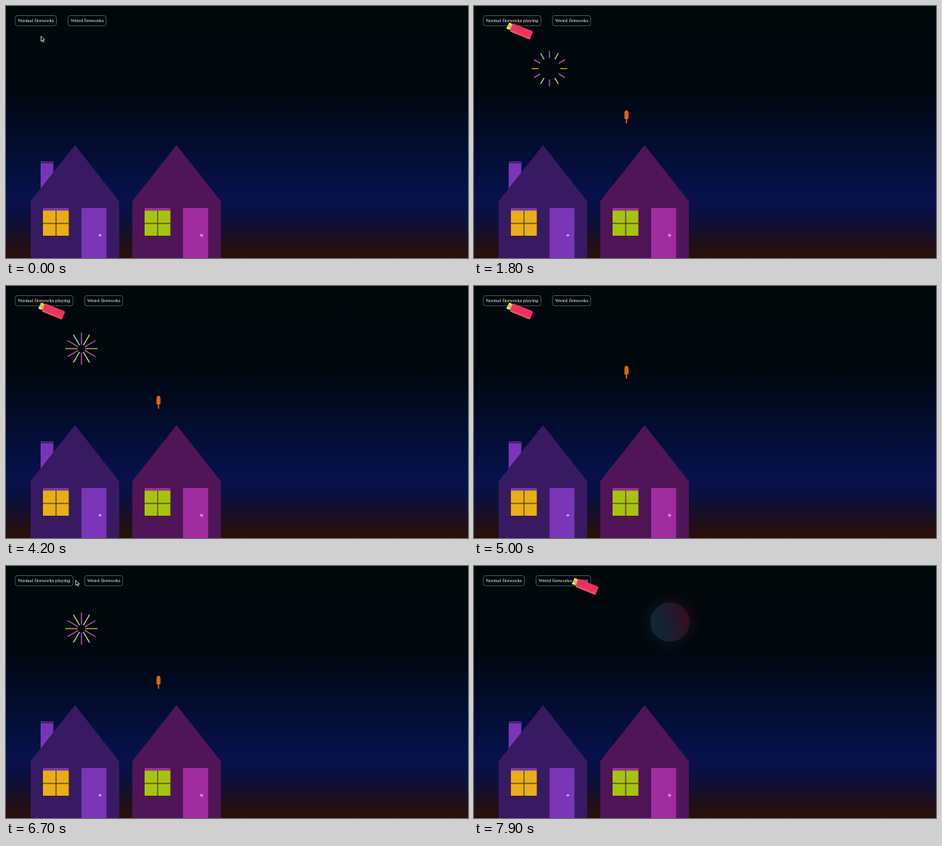
Animation, 600 px wide and 328 px high, one loop 8000 ms. Source, as an HTML page:

```html
<!DOCTYPE html>
<html lang="en">
<head>
<meta charset="utf-8">
<title>Fireworks</title>
<style>
  html, body { margin: 0; width: 100%; height: 100%; overflow: hidden; background: #01070b; }
  svg { display: block; width: 600px; height: 328px; }
  text { font: 6.6px "Liberation Serif", "Times New Roman", serif; fill: #f4f4f4; }
  .btn rect { fill: #03090c; stroke: #5b6066; stroke-width: .8; }
  .rays line { stroke-width: 1.4; }
</style>
</head>
<body>
<svg viewBox="0 0 600 328">
  <defs>
    <linearGradient id="sky" x1="0" y1="0" x2="0" y2="1">
      <stop offset="0" stop-color="#01080a"/>
      <stop offset=".31" stop-color="#01070c"/>
      <stop offset=".46" stop-color="#010a20"/>
      <stop offset=".61" stop-color="#030e38"/>
      <stop offset=".75" stop-color="#07114c"/>
      <stop offset=".81" stop-color="#081046"/>
      <stop offset=".88" stop-color="#120f30"/>
      <stop offset=".95" stop-color="#220f16"/>
      <stop offset="1" stop-color="#2a1008"/>
    </linearGradient>
    <linearGradient id="neon" x1="0" y1=".65" x2="1" y2=".35">
      <stop offset=".05" stop-color="#f0246c"/>
      <stop offset=".45" stop-color="#8f62a8"/>
      <stop offset=".8" stop-color="#4a92c8"/>
    </linearGradient>
    <pattern id="grain" width="2.4" height="2.4" patternUnits="userSpaceOnUse" patternTransform="rotate(28)">
      <circle cx="1.2" cy="1.2" r=".8" fill="#0a0c24"/>
    </pattern>
    <filter id="blur" x="-100%" y="-100%" width="300%" height="300%">
      <feGaussianBlur stdDeviation="10"/>
    </filter>
  </defs>

  <rect width="600" height="328" fill="url(#sky)"/>

  <g id="rocket" fill="#e0621c">
    <path d="M-2.6-5.5L-1.4-8H1.4L2.6-5.5V3H-2.6Z"/>
    <rect x="-1" y="3" width="2" height="5.6" fill="#c4500f"/>
  </g>
  <g id="burstA" class="rays"></g>
  <g id="burstB" class="rays"></g>
  <g id="orb">
    <g id="spin">
      <circle r="29" fill="url(#neon)" opacity=".45" filter="url(#blur)"/>
      <circle r="25.5" fill="url(#neon)"/>
      <circle r="25.5" fill="url(#grain)" opacity=".6"/>
    </g>
  </g>

  <path fill="#7a35b8" d="M45 202h16.5v40H45z"/>
  <path fill="#4e2276" d="M45 202h16.5v3H45z"/>
  <g id="houses"></g>

  <g class="btn" id="normal"><rect x="0" y="12.5" height="13.3" rx="3"/><text x="3.2" y="21"></text></g>
  <g class="btn" id="weird"><rect x="0" y="12.5" height="13.3" rx="3"/><text x="3.6" y="21"></text></g>

  <path id="arrow" d="M0 0V6.6L1.6 5.2L2.7 7.7L3.8 7.2L2.7 4.8H4.8Z" fill="#000" stroke="#fff" stroke-width=".7"/>
  <g id="lighter">
    <g transform="rotate(22)">
      <rect x="-3.6" y="-4.6" width="6" height="8.6" fill="#c3b85a"/>
      <rect x="-2.6" y="-4.6" width="3" height="3.4" fill="#f2d33a"/>
      <rect x="-3.6" y="1" width="3.4" height="3" fill="#e6dfb4"/>
      <rect x="2" y="-5.6" width="28" height="11.4" rx="1" fill="#f3305f"/>
      <rect x="2" y="3.6" width="28" height="2.2" rx="1" fill="#e2575c"/>
    </g>
  </g>
</svg>
<script>
const $ = id => document.getElementById(id);
const LOOP = 8000, STEP = 100, CYCLE = 2500, SWITCH = 7400;

const house = (x, wall, trim, glass) => `<g transform="translate(${x})">
  <path fill="${wall}" d="M0 254L57.5 181L115 254V328H0Z"/>
  <path fill="${trim}" d="M16 263h33.5v3.2H16zM66 263h32.5v65H66z"/>
  <path fill="${glass}" d="M16 266.2h33.5V299H16z"/>
  <path d="M33 266.2V299M16 283h33.5" stroke="#3a2412" stroke-width="1"/>
  <circle cx="90" cy="298.4" r="1.7" fill="#d4c4dc"/>
  <circle cx="90" cy="298.4" r=".7" fill="#6d5a86"/></g>`;
$('houses').innerHTML = house(32, '#381a62', '#7a35b8', '#e9b010')
  + house(164, '#501557', '#a02da0', '#a6c40c');

// Twelve rays; the colours repeat every half turn.
function makeRays(el, colors) {
  el.innerHTML = Array.from({ length: 12 }, (_, i) =>
    `<line transform="rotate(${i * 30})" stroke="${colors[i % 6]}"/>`).join('');
}
makeRays($('burstA'), ['#b3a52c', '#b653b4', '#a8cf9c', '#a957b8', '#a8cf9c', '#b653b4']);
makeRays($('burstB'), ['#f09a4a', '#e8602c', '#dc4a3c', '#f08a3a', '#dc4a3c', '#e8602c']);

function show(el, on) { el.style.display = on ? '' : 'none'; }
function place(el, x, y, extra = '') { el.setAttribute('transform', `translate(${x} ${y}) ${extra}`); }

// Time since the latest repeat, or -1 when inactive.
const since = (t, start) => t < start || t >= SWITCH ? -1 : (t - start) % CYCLE;

function burst(el, s, x, y, scale) {
  const on = s >= 0 && s <= 690;
  show(el, on);
  if (!on) return;
  const outer = 24 * (1 - Math.pow(Math.max(0, 1 - s / 680), 1.7));
  const inner = Math.min(outer, Math.max(0, (s - 425) * .09));
  place(el, x, y, `scale(${scale})`);
  for (const ray of el.children) {
    ray.setAttribute('x1', inner);
    ray.setAttribute('x2', outer);
  }
}

function rocket(t) {
  const s = since(t, 1000), on = s >= 0 && s < 2220;
  show($('rocket'), on);
  if (on) place($('rocket'), 198, 103.6 + 14.65 * Math.pow((2300 - s) / 1000, 2.5));
}

function button(id, x, label, width, playing) {
  const el = $(id);
  place(el, x, 0);
  el.querySelector('rect').setAttribute('width', width + (playing ? 21.5 : 0));
  el.querySelector('text').textContent = label + (playing ? ' playing' : '');
}

// start, x, y, shape
const pointer = [
  [0, 45.5, 39.3, 'arrow'], [100, 47, 27, 'lighter'], [6600, 76, 25, 'arrow'],
  [6700, 90.6, 18.6, 'arrow'], [6800, 112, 20, 'lighter'],
  [6900, 126, 21, 'lighter'], [7000, 132, 21, 'lighter']
];

function orb(t) {
  const s = t - SWITCH;
  show($('orb'), s >= 0);
  if (s < 0) return;
  place($('orb'), 254.5, 73);
  $('orb').setAttribute('opacity', s < 200 ? .3 + s * .0035 : 1 - (s - 200) * .00245);
  $('spin').setAttribute('transform', `rotate(${(s - 200) * .6})`);
}

function draw(now) {
  const t = Math.floor(now % LOOP / STEP) * STEP;
  const normal = t >= 300 && t < SWITCH, weird = t >= SWITCH;
  button('normal', 12, 'Normal fireworks', 53.5, normal);
  button('weird', normal ? 102 : 80.5, 'Weird fireworks', 49.6, weird);
  rocket(t);
  burst($('burstA'), since(t, 1220), 98, 81.5, 1);
  burst($('burstB'), since(t, 3220), 197, 93, .71);
  orb(t);
  const [, x, y, shape] = pointer.filter(p => p[0] <= t).pop();
  for (const id of ['arrow', 'lighter']) show($(id), id === shape);
  place($(shape), x, y);
}

const begin = performance.now();
function tick() {
  draw(performance.now() - begin);
  requestAnimationFrame(tick);
}
tick();
</script>
</body>
</html>
```
